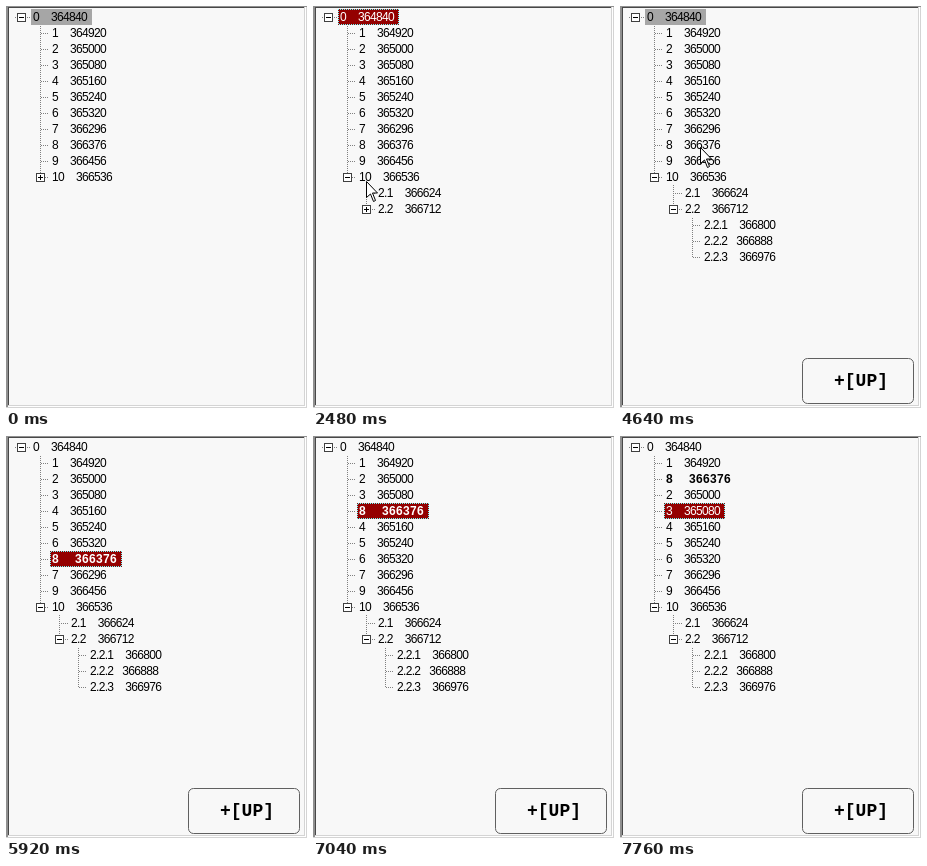
An HTML page for the animation above (8000 ms loop, 301 by 402 pixels).

```html
<!DOCTYPE html>
<html lang="en">
<head>
<meta charset="utf-8">
<title>Tree view</title>
<style>
  html, body { margin: 0; width: 100%; height: 100%; overflow: hidden; background: #f8f8f8; }
  svg { display: block; }
  text { font: 12px "Liberation Sans", Arial, sans-serif; letter-spacing: -.67px; word-spacing: .33px; white-space: pre; }
  .bold { font-weight: bold; letter-spacing: .33px; }
  .key { font: bold 18px "Liberation Mono", "Courier New", monospace; letter-spacing: 0; }
  .crisp { shape-rendering: crispEdges; }
</style>
</head>
<body>
<svg id="stage" width="301" height="402" viewBox="0 0 301 402">
  <defs>
    <pattern id="dots" width="2" height="2" patternUnits="userSpaceOnUse">
      <path class="crisp" fill="#808080" d="M0 0h1v1h-1zM1 1h1v1h-1z"/>
    </pattern>
    <pattern id="focus" width="2" height="2" patternUnits="userSpaceOnUse">
      <path class="crisp" fill="#6bffff" d="M0 0h1v1h-1zM1 1h1v1h-1z"/>
    </pattern>
  </defs>
  <g class="crisp">
    <path fill="#d4d4d4" d="M0 0H301V402H0Z"/>
    <path fill="#fff" d="M0 0H300V401H0Z"/>
    <path fill="#d4d4d4" d="M0 0H299V400H0Z"/>
    <path fill="#f8f8f8" d="M0 0H298V399H0Z"/>
    <path fill="#909090" d="M0 0H301V1H2V401H0Z"/>
    <path fill="#484848" d="M2 1H298V2H3V399H2Z"/>
  </g>
  <g id="tree"></g>
  <g id="key">
    <rect x="182.5" y="352.5" width="111" height="45" rx="5" fill="#f8f8f8" stroke="#606060"/>
    <text class="key" x="214" y="380">+[UP]</text>
  </g>
  <path id="cursor" fill="#fff" stroke="#000" d="M.5 .5V16.5L4.5 13L7.5 20.5L9.5 19.5L6.5 12H11.5Z"/>
</svg>
<script>
const LOOP = 8000, ROW = 16, INDENT = 19;
const values = {
  0: 364840, 1: 364920, 2: 365000, 3: 365080, 4: 365160, 5: 365240,
  6: 365320, 7: 366296, 8: 366376, 9: 366456, 10: 366536,
  '2.1': 366624, '2.2': 366712, '2.2.1': 366800, '2.2.2': 366888, '2.2.3': 366976
};
const RED = '#940000', GREY = '#a6a6a6';

// Each step changes part of the state; cursor: [x, y] or null.
const steps = [
  [0, { order: '123456789', open: 0, selected: 0, color: GREY, bold: false, key: false, cursor: null }],
  [320, { cursor: [180, 176] }],
  [400, { cursor: [112, 170] }],
  [480, { cursor: [60, 166] }],
  [640, { cursor: [42, 170] }],
  [720, { cursor: [32, 172] }],
  [960, { cursor: [34, 172] }],
  [1600, { cursor: [37, 167] }],
  [1680, { cursor: [45, 150] }],
  [1760, { cursor: [37, 161] }],
  [1920, { cursor: [36, 164] }],
  [2000, { cursor: [36, 167] }],
  [2160, { open: 1, color: RED }],
  [2320, { cursor: [36, 170] }],
  [2480, { cursor: [53, 175] }],
  [2560, { cursor: [75, 188] }],
  [2640, { cursor: [53, 190] }],
  [2800, { cursor: [41, 200] }],
  [2880, { cursor: [52, 203] }],
  [3120, { open: 2 }],
  [3200, { cursor: [128, 197] }],
  [3360, { cursor: null }],
  [3760, { color: GREY }],
  [3920, { key: true }],
  [4080, { cursor: [177, 178] }],
  [4320, { cursor: [126, 164] }],
  [4400, { cursor: [88, 152] }],
  [4560, { cursor: [83, 146] }],
  [4640, { cursor: [80, 141] }],
  [4720, { selected: 8, color: RED }],
  [4880, { cursor: null }],
  [5920, { order: '123456879', selected: 7, bold: true }],
  [6480, { order: '123458679', selected: 6 }],
  [6800, { order: '123485679', selected: 5 }],
  [7040, { order: '123845679', selected: 4 }],
  [7280, { order: '128345679', selected: 3 }],
  [7360, { order: '1828345679', selected: 2 }],
  [7440, { order: '182345679' }],
  [7680, { selected: 3 }],
  [7760, { selected: 4 }]
];

const $ = id => document.getElementById(id);
const dotted = (x, y, width, height) =>
  `<rect class="crisp" x="${x}" y="${y}" width="${width}" height="${height}" fill="url(#dots)"/>`;

function toggle(x, y, open) {
  const sign = `M${x - 2} ${y + .5}h5` + (open ? '' : `M${x + .5} ${y - 2}v5`);
  return `<g class="crisp" stroke="#404040"><rect x="${x - 3.5}" y="${y - 3.5}" width="8" height="8" fill="#fff"/>` +
    `<path stroke="#000" d="${sign}"/></g>`;
}

function treeRows({ order, open }) {
  const rows = [['0', 0, true], ...[...order].map(id => [id, 1]), ['10', 1, open > 0]];
  if (open > 0) rows.push(['2.1', 2], ['2.2', 2, open > 1]);
  if (open > 1) rows.push(['2.2.1', 3], ['2.2.2', 3], ['2.2.3', 3]);
  return rows;
}

function drawTree(state) {
  let lines = '', nodes = '';
  const topY = [], lastY = [];
  treeRows(state).forEach(([id, level, open], i) => {
    const y = 11 + ROW * i, branchX = 15 + INDENT * level, left = 25 + INDENT * level;
    const active = i === state.selected, red = active && state.color === RED;
    const bold = state.bold && id === '8';
    const lineX = level ? branchX : 8;
    topY[level + 1] = y + 8;
    lastY[level] = y;
    lines += dotted(lineX, y, left - 1 - lineX, 1);
    if (open !== undefined) nodes += toggle(branchX, y, open);
    if (active) {
      const width = bold ? 72 : 61;
      nodes += `<rect class="crisp" x="${left}" y="${y - 8}" width="${width}" height="16" fill="${state.color}"/>`;
      if (red) nodes += `<rect class="crisp" x="${left + .5}" y="${y - 7.5}" width="${width - 1}" height="15" ` +
        'fill="none" stroke="url(#focus)"/>';
    }
    const gap = ' '.repeat(id === '2.2.2' ? 3 : 4);
    nodes += `<text x="${left + 2}" y="${y + 4}" class="${bold ? 'bold' : ''}" ` +
      `fill="${red ? '#fff' : '#000'}">${id}${gap}${values[id]}</text>`;
  });
  for (let level = 1; level < lastY.length; level++) {
    lines += dotted(15 + INDENT * level, topY[level], 1, lastY[level] - topY[level]);
  }
  return lines + nodes;
}

function draw(state) {
  $('tree').innerHTML = drawTree(state);
  $('key').style.display = state.key ? '' : 'none';
  $('cursor').style.display = state.cursor ? '' : 'none';
  if (state.cursor) $('cursor').setAttribute('transform', `translate(${state.cursor})`);
}

const start = performance.now();
let shown = -1;
function tick() {
  const time = (performance.now() - start) % LOOP;
  const past = steps.filter(([at]) => at <= time);
  if (past.length !== shown) {
    shown = past.length;
    draw(Object.assign({}, ...past.map(([, change]) => change)));
  }
  requestAnimationFrame(tick);
}
tick();
</script>
</body>
</html>
```
